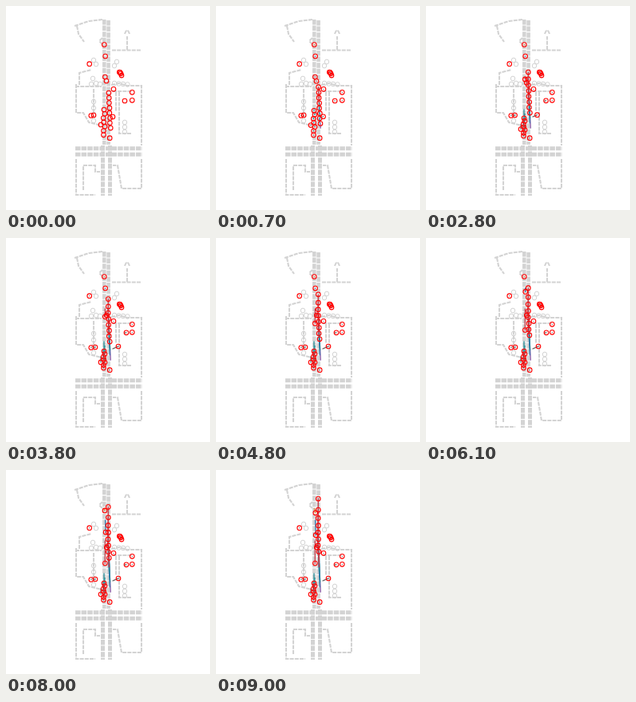
An HTML page with a canvas that plays this animation: 256x256 px, repeating every 9.1 s.

```html
<!DOCTYPE html>
<html lang="en">
<head>
<meta charset="utf-8">
<title>Traffic tracks</title>
<style>
html, body { margin: 0; width: 100%; height: 100%; overflow: hidden; background: #fff; }
svg, canvas { position: absolute; left: 0; top: 0; width: 256px; height: 256px; }
svg { fill: none; stroke: #d3d3d3; }
</style>
</head>
<body>
<svg viewBox="0 0 256 256">
  <!-- main street and crossing -->
  <g stroke-width="4.6" stroke-dasharray="6.5 1.1">
    <path d="M123.3 17V174M128.6 18V174"/>
    <path d="M121.5 175V238M130.5 175V238" stroke-width="5"/>
    <path d="M87 178.8H171M87 186.2H171" stroke-width="5"/>
  </g>
  <!-- side streets -->
  <g stroke-width="2.1" stroke-dasharray="5 1.2">
    <path d="M86 25L104 19L121 17M89 25L91 35L98 45M121 40L117 44L121 48"/>
    <path d="M133 55.5H170M152 55V38M149 35Q152 26 155 35"/>
    <path d="M87 101H120M88 98V134H97L104 146L120 150M92 99V84L107 80M110 104V134"/>
    <path d="M132 99L142 97L152 100H170V175M134 107H158M138 108V132M142 108V160H158"/>
    <path d="M88 192V237H112M97 231V200H112V208H118"/>
    <path d="M170 192V229H145L140 200H134"/>
  </g>
  <g id="bays"></g>
</svg>
<canvas id="stage" width="256" height="256"></canvas>
<script>
const STEP = 100, STEPS = 91;
const TEAL = "#258f99", BLUE = "#2b78ad", RED = "#c23b48", GREY = "#666";
const range = (n, make) => Array.from({ length: n }, (_, i) => make(i));
const lerp = (a, b, k) => a + (b - a) * k;
const ease = k => k * k * (3 - 2 * k);

// A road user that eases from one point to another between two times in seconds
const move = (color, x0, y0, x1 = x0, y1 = y0, from = 0, to = 4) => ({
  color,
  at(s) {
    const k = ease(Math.min(1, Math.max(0, (s - from) / (to - from))));
    return [lerp(x0, x1, k), lerp(y0, y1, k)];
  }
});
const parked = (x, y) => move(GREY, x, y);

// The northbound platoon spreads out as it drives off
const north = i => ({
  color: i < 3 ? RED : i < 7 ? [BLUE, TEAL][i % 2] : "#8c5aa8",
  at(s) {
    const cruise = lerp(109 + 6.3 * i, 36 + 14 * i ** 0.8, s / 9);
    const y = cruise - 3.5 * Math.sin(2 * Math.PI * s / 9);
    return [128.3 + Math.max(0, y - 95) * 0.045 + 0.4 * Math.sin(3 * i), y];
  }
});

// The southbound queue closes its gaps
const queued = i => {
  const x = 123 + Math.sin(2 * i);
  return move(i < 4 ? TEAL : GREY, x, 130 + 5.3 * i, x, 142 + 3.5 * i, 0, 3.5);
};

const tracks = [
  ...range(4, i => parked(142.3 + 0.9 * i, 83 + 0.45 * i * i)),
  parked(104.7, 72.7),
  parked(135, 104.3),
  parked(158.3, 108.3),
  parked(158.3, 118.3),
  parked(106.8, 137.5),
  parked(130.2, 165.7),
  move(GREY, 110, 137, 112, 137),
  move(GREY, 149, 119, 151, 118.8),
  move(GREY, 134, 139, 141, 136),
  move(GREY, 119, 149, 119, 156),
  ...range(7, queued),
  move("#e58b35", 123.3, 48.5, 124.8, 54, 7, 9.2),
  move(BLUE, 124.6, 63, 125.2, 82, 4.6, 9.4),
  move(RED, 124.3, 89, 124.3, 117, 1.8, 6.8),
  move(RED, 126, 94, 126.3, 97),
  ...range(8, north).reverse()
];

const bayRow = (x, y, dx, dy, n) => range(n, i =>
  `<ellipse cx="${x + i * dx}" cy="${y + i * dy}" rx="2.7" ry="2.9"/>`).join("");
document.getElementById("bays").innerHTML =
  bayRow(110, 68, 3, 5, 2) + bayRow(109, 91, -2, 7, 2) + bayRow(113, 97, 5, 1, 2) +
  bayRow(139, 70, -3, 5, 2) + bayRow(136, 97, 5.5, 0.5, 4) +
  bayRow(110, 120, 0, 8, 4) + bayRow(149, 146, 0, 6, 3);

const ctx = document.getElementById("stage").getContext("2d");
ctx.lineCap = ctx.lineJoin = "round";

function draw(step) {
  ctx.clearRect(0, 0, 256, 256);
  ctx.lineWidth = 1.3;
  if (step) for (const { color, at } of tracks) {
    ctx.strokeStyle = color;
    ctx.beginPath();
    ctx.moveTo(...at(0));
    for (let i = 1; i <= step; i++) ctx.lineTo(...at(i / 10));
    ctx.stroke();
  }
  ctx.strokeStyle = "#f00";
  ctx.lineWidth = 1.1;
  for (const { at } of tracks) {
    ctx.beginPath();
    ctx.arc(...at(step / 10), 2.8, 0, 2 * Math.PI);
    ctx.stroke();
  }
}

const start = performance.now();
function tick() {
  draw(Math.floor((performance.now() - start) / STEP) % STEPS);
  requestAnimationFrame(tick);
}
tick();
</script>
</body>
</html>
```
